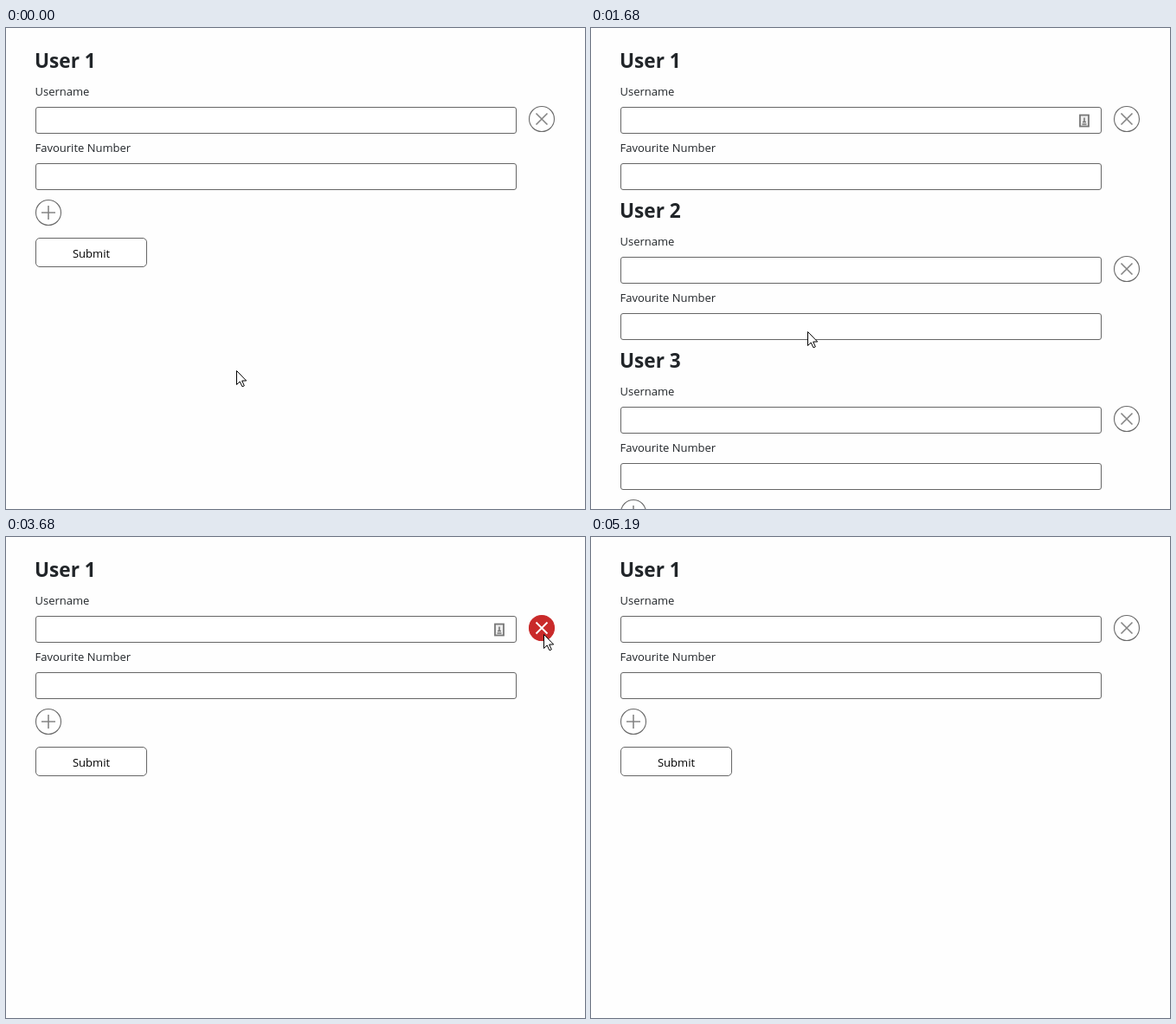
An HTML page that plays this animation: 669 by 555 pixels, repeating every 5.4 s.

```html
<!DOCTYPE html>
<html lang="en">
<head>
<meta charset="utf-8">
<title>Dynamic form</title>
<style>
  html, body { margin: 0; width: 100%; height: 100%; overflow: hidden; background: #fefefe; }
  svg { display: block; width: 669px; height: 555px; }
  text { font: 13px "Open Sans", "Noto Sans", sans-serif; fill: #212529; }
  .title { font-size: 22.6px; font-weight: 700; }
  .box { fill: #fff; stroke: #666; }
  .round circle { fill: #fff; stroke: #6b6b6b; stroke-width: 1.1; }
  .round path { fill: none; stroke: #858585; stroke-width: 1.6; }
  .round.hover path { stroke: #fff; stroke-width: 1.9; }
  .add.hover circle { fill: #00a2ff; stroke: #00a2ff; }
  .remove.hover circle { fill: #c92a2a; stroke: #c92a2a; }
  .pointer { fill: #fff; stroke: #000; stroke-linejoin: round; }
</style>
</head>
<body>
<svg viewBox="0 0 669 555">
  <g id="blocks"></g>
  <g id="footer">
    <g class="round add" id="add">
      <circle cx="49" cy="213" r="14.5"/>
      <path d="M41 213H57M49 205V221"/>
    </g>
    <rect class="box" x="34.5" y="242.5" width="128" height="33" rx="4.5"/>
    <text x="98.5" y="265" text-anchor="middle" style="fill:#000">Submit</text>
  </g>
  <g id="icon">
    <rect x="565" y="100.5" width="10" height="13" fill="#eee" stroke="#777" stroke-width="1.8"/>
    <path d="M570 103.5V108M568 108.5H572M567.5 111H572.5" stroke="#777" stroke-width="1.6"/>
  </g>
  <g id="cursor">
    <path class="pointer" id="arrow" d="M.5 .5V16.5L4.2 13L7 18.8L9.3 17.8L6.7 12H11.7Z"/>
    <g class="pointer" id="hand">
      <path stroke-width="1.2" d="M-1.5 14V2Q-1.5 .5 .2 .5Q2 .5 2 2V7.5Q2 6.5 3.5 6.5Q5 6.6 5 8Q5.2 7.3 6.5 7.5Q7.8 7.7 7.8 9Q8.3 8.5 9.3 8.8Q10.4 9.2 10.4 10.5V16Q10.4 18 9 20V22.8H-.5V20.8Q-3 18.5 -5 15Q-7 12 -5.8 11.2Q-4.6 10.4 -3 12.2Z"/>
      <path fill="none" d="M2 7.5V12M5 8V12M7.8 9V12.5"/>
    </g>
    <path id="beam" fill="none" stroke="#000" d="M-3 -7.5H-1L0 -6.5L1 -7.5H3M0 -6.5V6.5M-3 7.5H-1L0 6.5L1 7.5H3"/>
  </g>
  <circle id="press" r="12.5" fill="#ff0" fill-opacity=".5"/>
</svg>
<script>
const LOOP = 5400, PITCH = 173;
const $ = id => document.getElementById(id);

const field = y => `<rect class="box" x="34.5" y="${y}.5" width="555" height="30" rx="2.5"/>`;
const block = n => `<g transform="translate(0 ${n * PITCH})">
  <text class="title" x="33" y="46">User ${n + 1}</text>
  <text x="33.5" y="78">Username</text>${field(91)}
  <text x="33.5" y="143">Favourite Number</text>${field(156)}
  <g class="round remove"><circle cx="619" cy="105" r="14.5"/>
  <path d="M612.5 98.5L625.5 111.5M625.5 98.5L612.5 111.5"/></g></g>`;
$('blocks').innerHTML = [0, 1, 2].map(block).join('');
const blocks = [...$('blocks').children];
const removers = [...document.querySelectorAll('.remove')];

// Number of blocks from each moment on
const counts = [[0, 1], [690, 2], [1330, 3], [2300, 2], [2870, 1], [3710, 0], [4630, 1]];
const presses = [[590, 690], [1240, 1330], [2200, 2300], [2790, 2870], [3450, 3660], [4540, 4630]];

const smooth = s => s * s * (3 - 2 * s);
const linear = s => s;
const start = [266, 395];
// Start time, end time, control point, end point, easing
const moves = [
  [0, 440, [140, 300], [52, 222], smooth],
  [720, 1110, [54, 310], [53, 396], smooth],
  [1380, 2100, [300, 283], [621, 446], smooth],
  [2340, 2740, [630, 365], [624, 284], smooth],
  [3000, 3370, [618, 200], [621, 112], smooth],
  [3890, 4270, [320, 142], [2, 84], smooth],
  [4270, 4450, [-6, 50], [40.5, 36], smooth],
  [4650, 5020, [300, 250], [586, 521], s => s * (.4 + .6 * s)],
  [5020, 5190, [600, 540], [614, 558], linear]
];

function cursorAt(t) {
  let from = start;
  for (const [t0, t1, mid, to, ease] of moves) {
    if (t < t0) return from;
    if (t < t1) {
      const s = ease((t - t0) / (t1 - t0)), r = 1 - s;
      return from.map((v, i) => r * r * v + 2 * r * s * mid[i] + s * s * to[i]);
    }
    from = to;
  }
  return from;
}

const show = (el, on) => { el.style.display = on ? '' : 'none'; };
const near = (x, y, cx, cy) => Math.hypot(x - cx, y - cy) <= 15;

function draw(t) {
  const count = counts.filter(c => c[0] <= t).pop()[1];
  const shift = (count - 1) * PITCH;
  const [x, y] = cursorAt(t);

  blocks.forEach((b, i) => show(b, i < count));
  $('footer').setAttribute('transform', `translate(0 ${shift})`);
  show($('icon'), t >= 1330 && t < 3710);

  const overAdd = near(x, y, 49, 213 + shift);
  $('add').classList.toggle('hover', overAdd);
  let overButton = overAdd;
  removers.forEach((r, i) => {
    const over = i < count && near(x, y, 619, 105 + i * PITCH);
    r.classList.toggle('hover', over);
    overButton = overButton || over;
  });

  const localY = y % PITCH;
  const overField = y < count * PITCH + 14 && x > 34 && x < 590 &&
    ((localY > 91 && localY < 122) || localY > 156 || localY < 14 && y > PITCH && false);
  const hand = overButton && !(t >= 3670 && t < 3900);
  show($('hand'), hand);
  show($('beam'), !hand && overField);
  show($('arrow'), !hand && !overField);
  const place = `translate(${Math.round(x)} ${Math.round(y)})`;
  $('cursor').setAttribute('transform', place);
  show($('cursor'), t < 5190);
  $('press').setAttribute('transform', place);
  show($('press'), presses.some(([a, b]) => t >= a && t < b));
}

const origin = performance.now();
function tick() {
  draw((performance.now() - origin) % LOOP);
  requestAnimationFrame(tick);
}
draw(0);
requestAnimationFrame(tick);
</script>
</body>
</html>
```
